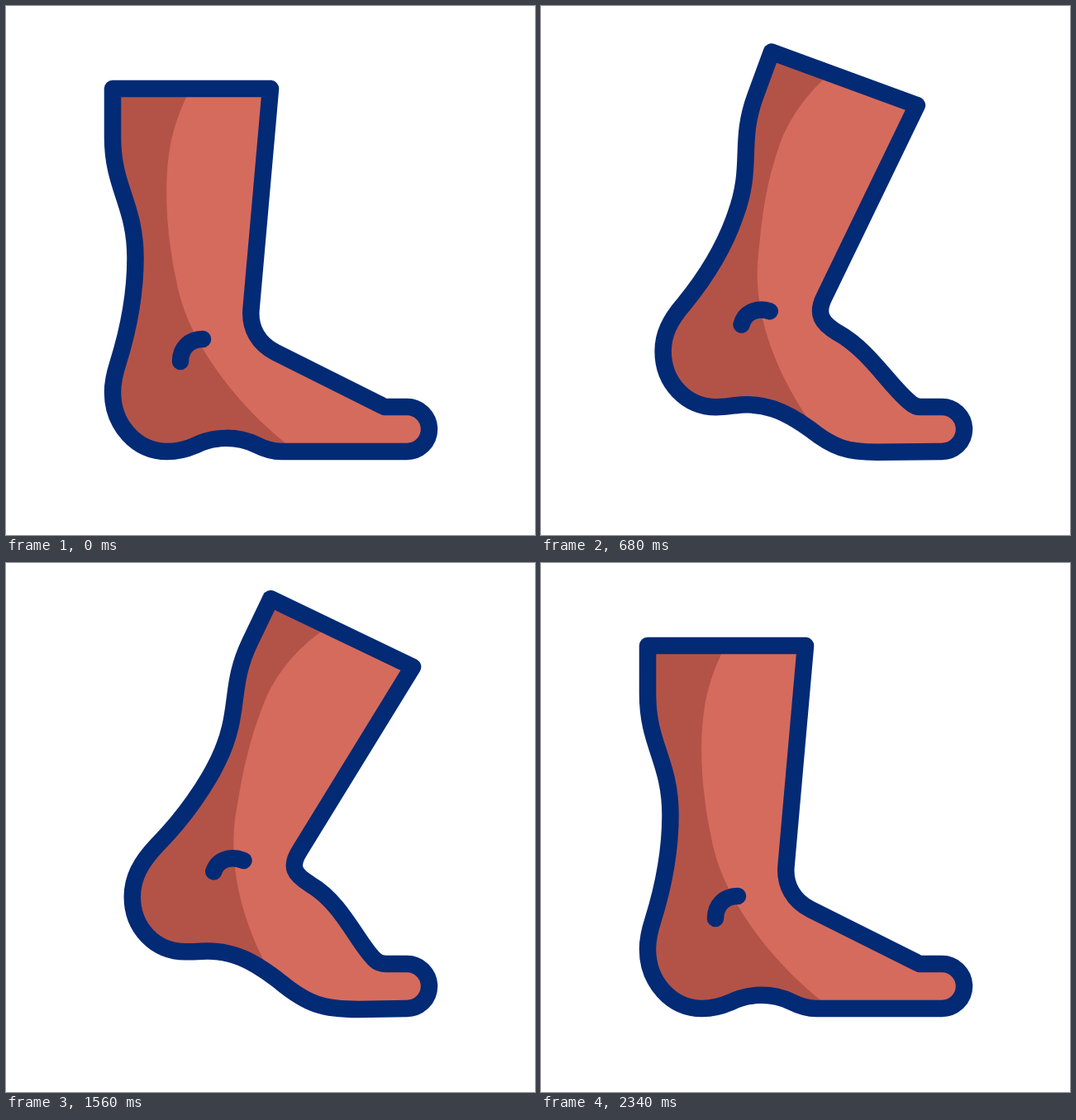
These frames come from a looping animation (640 px wide and 640 px high, 2400 ms). An HTML page:

```html
<!DOCTYPE html>
<html lang="en">
<head>
<meta charset="utf-8">
<title>Foot</title>
<style>
  html, body { margin: 0; width: 100%; height: 100%; overflow: hidden; background: #fff; }
  svg { display: block; width: 100%; height: 100%; }
  .line { fill: none; stroke: #032a75; stroke-width: 20.5; stroke-linecap: round; stroke-linejoin: round; }
</style>
</head>
<body>
<svg viewBox="0 0 640 640">
  <clipPath id="inside"><path data-shape="foot"/></clipPath>
  <path data-shape="foot" fill="#d56b5d"/>
  <path data-shape="shade" fill="#b35348" clip-path="url(#inside)"/>
  <path data-shape="foot" class="line"/>
  <path data-shape="mark" class="line"/>
</svg>
<script>
const LOOP = 2400, UP = 1200, DOWN = 2360;

// Each shape: flat on the ground, then heel raised.
const shapes = {
  foot: [
    `M129 100 L129 159 C129 220 156.5 240 156.5 305
     C156.5 350 148 392 135.5 432 C131 446 129 456 129 467
     C129 507 158 539 195 539 C207 539 219 536 228 532
     C252 520 280 520 303 531 C313 536 322 539 333 539
     L485 539 A27 27 0 0 0 485 485 L458 485 C457 485 455 483.5 452 482
     C410 461 368 440 326 419 C306 409 294.5 390 296.5 367 L320 100 Z`,
    `M338 38 L310.4 90 C281.8 144 296.8 174.7 266.4 232
     C250 262 222 300 188 332 C165 355 155 375 155 398
     C155 436 183 464 219 464 C226 464 232 464 238 464
     C275 463 300 477 335 505 C370 534 390 540 435 540
     L485 539 A27 27 0 0 0 485 485 L460 485 C456 485 451 485 446 480
     C428 462 410 408 372 386 C353 374 347 366 361 346 L508 128 Z`
  ],
  shade: [
    `M248 60 C218 102 202 142 197 180 C190 232 197 290 206 332
     C220 410 283 485 343 533 L0 640 L0 0 L400 0 Z`,
    `M406 77 C366 100 338 133 323 168 C301 220 293 260 284 305
     C274 365 286 425 311 480 L0 640 L0 0 L400 0 Z`
  ],
  mark: [
    'M211 430 C211 414 222 403 238 403',
    'M255 368 C260 354 276 349 292 356'
  ]
};

const number = /\d+(\.\d+)?/g;

function mix([from, to], k) {
  const ends = to.match(number);
  let i = 0;
  return from.replace(number, n => +n + (ends[i++] - n) * k);
}

// cubic-bezier(x1, 0, x2, 1)
function ease(x, x1, x2) {
  let lo = 0, hi = 1;
  for (let i = 0; i < 24; i++) {
    const s = (lo + hi) / 2, r = 1 - s;
    if (3 * r * r * s * x1 + 3 * r * s * s * x2 + s ** 3 < x) lo = s;
    else hi = s;
  }
  return lo * lo * (3 - 2 * lo);
}

function lift(t) {
  if (t < UP) return ease(t / UP, 0.8, 0.23);
  if (t < DOWN) return 1 - ease((t - UP) / (DOWN - UP), 0.8, 0.2);
  return 0;
}

const paths = [...document.querySelectorAll('[data-shape]')];
const start = performance.now();

function draw() {
  const k = lift((performance.now() - start) % LOOP);
  for (const p of paths) p.setAttribute('d', mix(shapes[p.dataset.shape], k));
  requestAnimationFrame(draw);
}
draw();
</script>
</body>
</html>
```
